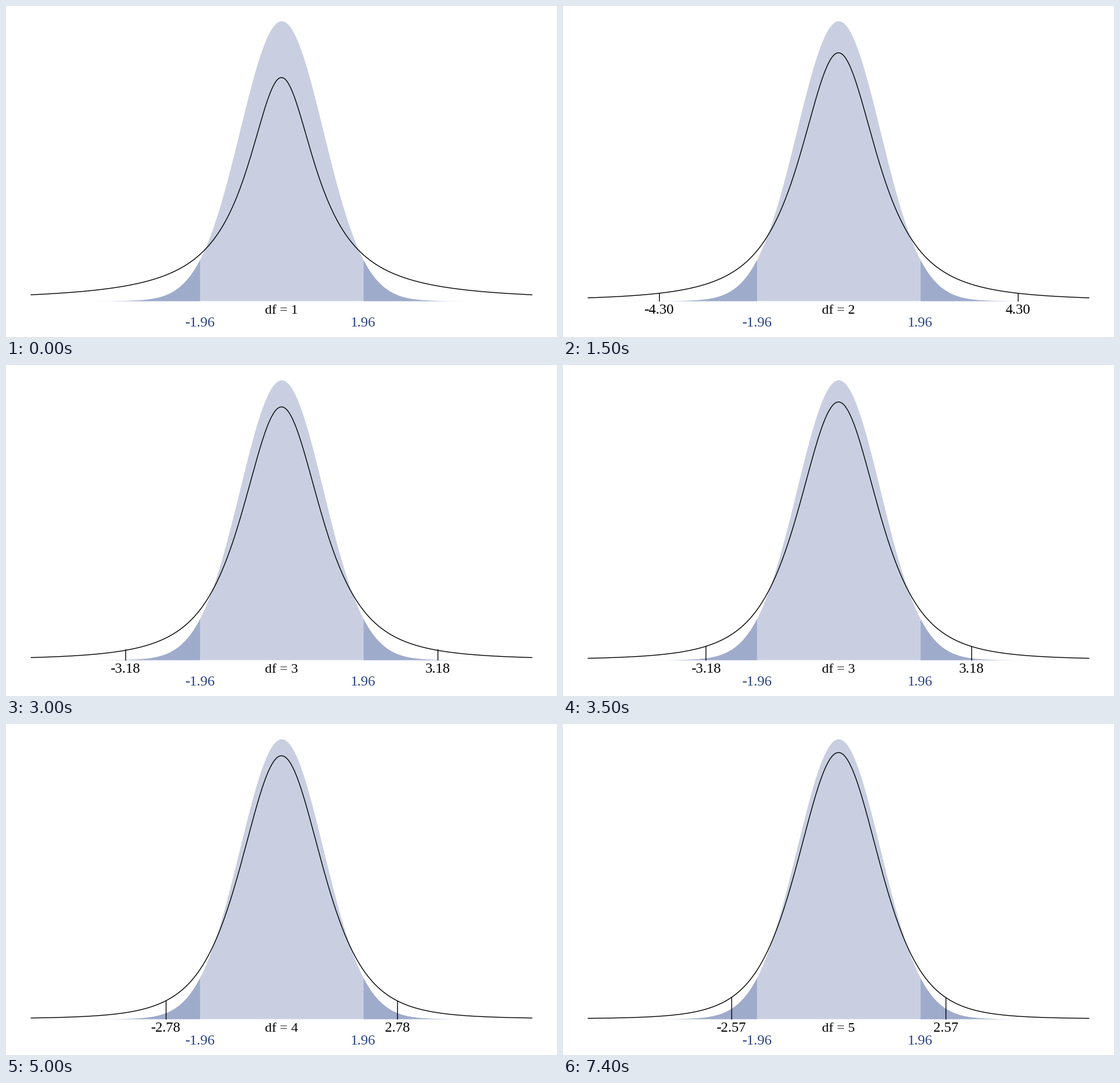
A matplotlib script for the animation above (8 s loop, 900 by 540 pixels).

```python
import math

import matplotlib.pyplot as plt
import numpy as np
from matplotlib.animation import FuncAnimation

W, H, DPI = 900, 540, 100
PX = 72 / DPI  # points per pixel
STEP_MS, STEPS = 500, 16

MID, BASE = 450, 481
X_UNIT, Y_UNIT = 818 / 12, 1144.5
Z_CRIT = 1.96
T_CRIT = {1: 12.706, 2: 4.303, 3: 3.182, 4: 2.776, 5: 2.571}
# (first step, degrees of freedom); a half value is midway between two curves
STAGES = [(0, 1), (2, 1.5), (3, 2), (6, 2.5), (7, 3), (10, 4), (13, 5)]

BLUE, TAIL, BODY = "#27408b", "#9fabcb", "#c9cfe1"


def px(x):
    return MID + X_UNIT * x


def py(density):
    return BASE - Y_UNIT * density


def normal_pdf(x):
    return np.exp(-x * x / 2) / math.sqrt(2 * math.pi)


def t_pdf(x, df):
    scale = math.gamma((df + 1) / 2) / (math.sqrt(df * math.pi) * math.gamma(df / 2))
    return scale * (1 + x * x / df) ** (-(df + 1) / 2)


def blend(func, df):
    """Mix func over the whole degrees of freedom on either side of df."""
    low, high = math.floor(df), math.ceil(df)
    share = df - low
    return (1 - share) * func(low) + share * func(high)


fig = plt.figure(figsize=(W / DPI, H / DPI), dpi=DPI, facecolor="white")
ax = fig.add_axes([0, 0, 1, 1])
ax.set_xlim(0, W)
ax.set_ylim(H, 0)
ax.axis("off")


def fill_normal(start, stop, color):
    x = np.linspace(start, stop, 400)
    ax.fill_between(px(x), py(normal_pdf(x)), BASE, color=color, linewidth=0)


def label(x, baseline, text, color="black", size=23.5):
    return ax.text(x, baseline, text, color=color, fontsize=size * PX,
                   family="Liberation Serif", ha="center", va="baseline",
                   clip_on=True)


fill_normal(-6, 6, BODY)
for side in (-1, 1):
    fill_normal(side * Z_CRIT, side * 6, TAIL)
    label(px(side * Z_CRIT), 523, f"{side * Z_CRIT:.2f}", BLUE)

grid = np.linspace(-6, 6, 601)
curve, = ax.plot([], [], color="black", lw=1.35 * PX)
ticks = [ax.plot([], [], color="black", lw=1.35 * PX)[0] for _ in range(2)]
crit_labels = [label(MID, 502, "") for _ in range(2)]
df_label = label(MID, 502, "", size=22.5)


def draw(step):
    df = [value for start, value in STAGES if start <= step][-1]
    target = math.ceil(df)
    curve.set_data(px(grid), py(blend(lambda k: t_pdf(grid, k), df)))
    crit = blend(T_CRIT.get, df)
    top = py(blend(lambda k: t_pdf(T_CRIT[k], k), df))
    for side, tick, text in zip((-1, 1), ticks, crit_labels):
        x = px(side * crit)
        tick.set_data([x, x], [BASE, top])
        text.set_x(x)
        text.set_text(f"{side * T_CRIT[target]:.2f}")
    df_label.set_text(f"df = {target}")
    return [curve, *ticks, *crit_labels, df_label]


anim = FuncAnimation(fig, draw, frames=STEPS, interval=STEP_MS,
                     repeat=True, repeat_delay=0, blit=False)
plt.show()
```
